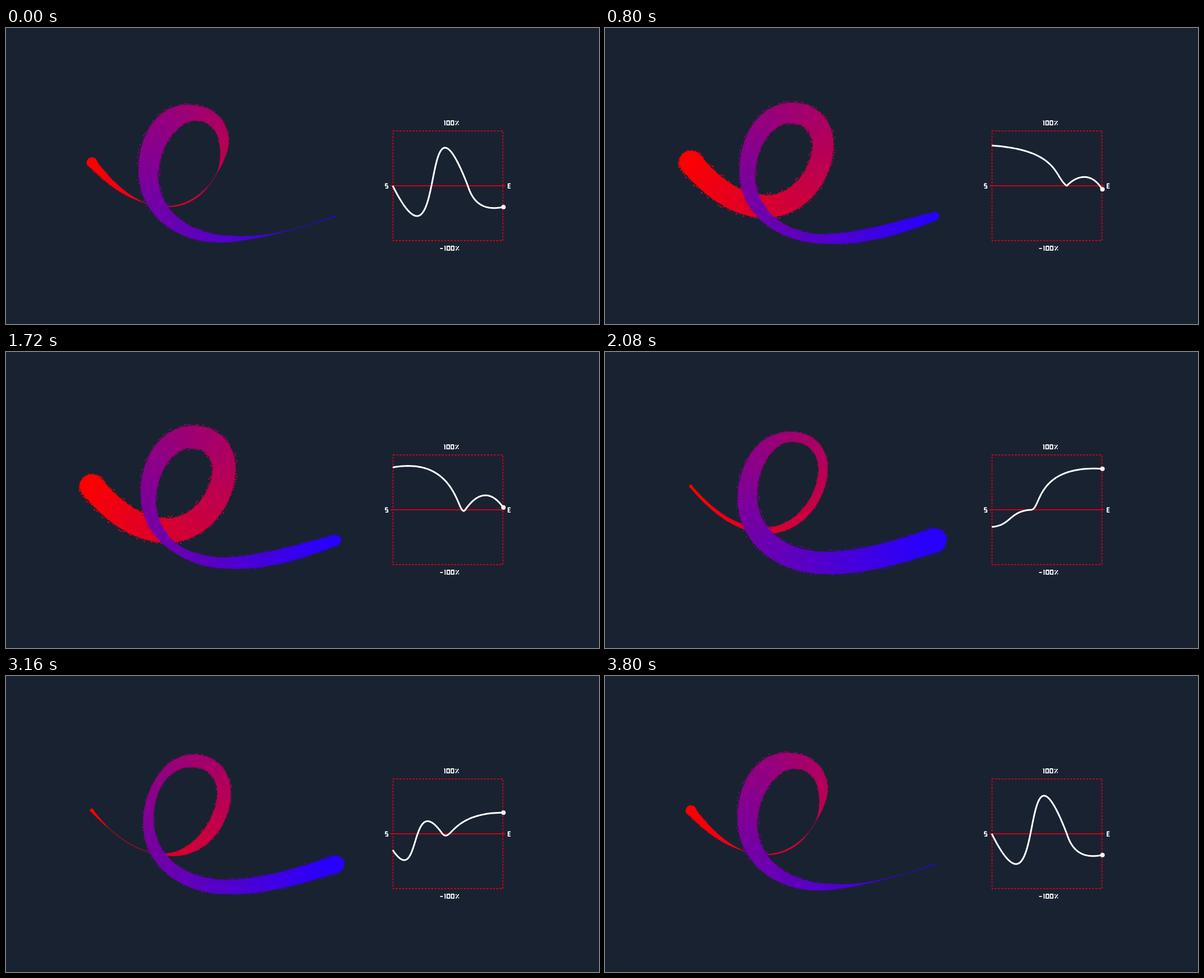
Recreate the animation shown at these times as an HTML page with a canvas. Size 1058x529 px, loop 3.84 s.

```html
<!DOCTYPE html>
<html lang="en">
<head>
<meta charset="utf-8">
<title>Stroke width profile</title>
<style>
  html, body { margin: 0; width: 100%; height: 100%; overflow: hidden; background: #192231; }
  canvas { display: block; width: 1058px; height: 529px; }
</style>
</head>
<body>
<canvas id="stage" width="1058" height="529" role="img" aria-label="Stroke width graph from S to E, 100% to -100%"></canvas>
<script>
const ctx = document.getElementById('stage').getContext('2d');
const LOOP = 3840, TICK = 40;
const LEFT = 690, SPAN = 197, ZERO = 282, HALF = 98;
const BASE = 15.5, GAIN = 2.2, STEPS = 80;

// Brush path: chained cubic beziers, with the profile position of each node
const PATH = [153,240, 195,290, 240,320, 290,319, 345,318, 389,262, 389,208,
  389,174, 366,151.5, 333,151.5, 285,151.5, 254,205, 254,260,
  254,325, 310,377, 395,377, 465,377, 530,355, 588,336.5];
const NODE_U = [0, .175, .35, .38, .555, .70, 1];

// Width profiles: two cubic beziers each, reached at the key times
const POSES = [
  [690,282, 788,479, 737,57, 824,282, 836,321, 861,325, 887,320],
  [690,198, 815,175, 812,302, 824,282, 842,254, 869,245, 887,283],
  [690,329, 712,329, 708,282, 751,282, 770,285, 752,196, 887,198]
];
const KEYS = [0, 1310, 2550, LOOP];

const mix = (a, b, k) => a + (b - a) * k;
const easeQuint = k => k < .5 ? 16 * k ** 5 : 1 - 16 * (1 - k) ** 5;

function cubic(p, seg, t) {
  const o = seg * 6, s = 1 - t;
  const w = [s * s * s, 3 * s * s * t, 3 * s * t * t, t * t * t];
  let x = 0, y = 0;
  w.forEach((k, i) => { x += k * p[o + 2 * i]; y += k * p[o + 2 * i + 1]; });
  return { x, y };
}

function randomizer(seed) {
  return () => {
    seed = (seed * 1664525 + 1013904223) >>> 0;
    return seed / 4294967296;
  };
}

// Sampled brush path with unit normals and fixed edge roughness
const brush = [];
const rand = randomizer(71);
let total = 0;
for (let s = 0; s < NODE_U.length - 1; s++) {
  for (let i = s ? 1 : 0; i <= STEPS; i++) {
    const t = i / STEPS, p = cubic(PATH, s, t);
    const a = cubic(PATH, s, t - .002), b = cubic(PATH, s, t + .002);
    const len = Math.hypot(b.x - a.x, b.y - a.y);
    const last = brush[brush.length - 1] || p;
    total += Math.hypot(p.x - last.x, p.y - last.y);
    brush.push({
      ...p,
      dist: total,
      u: mix(NODE_U[s], NODE_U[s + 1], t),
      nx: (a.y - b.y) / len, ny: (b.x - a.x) / len,
      rough: [rand() ** 2, rand() ** 2]
    });
  }
}
const capRough = Array.from({ length: 48 }, () => rand() ** 2);

function disc(x, y, r) {
  ctx.beginPath();
  ctx.arc(x, y, r, 0, Math.PI * 2);
  ctx.fill();
}

function poseAt(ms) {
  const i = KEYS.findIndex((key, n) => ms < KEYS[n + 1]);
  const k = easeQuint((ms - KEYS[i]) / (KEYS[i + 1] - KEYS[i]));
  const next = POSES[(i + 1) % POSES.length];
  return POSES[i].map((v, j) => mix(v, next[j], k));
}

function drawBrush(profile) {
  let j = 0;
  brush.forEach((p, n) => {
    const gx = LEFT + SPAN * p.u;
    while (j < profile.length - 2 && profile[j + 1].x < gx) j++;
    const a = profile[j], b = profile[j + 1];
    const y = mix(a.y, b.y, (gx - a.x) / (b.x - a.x || 1));
    const r = Math.max(.8, Math.abs(1 + GAIN * (ZERO - y) / HALF) * BASE / 2);
    const amp = Math.min(5, r * .28), dot = Math.min(1.7, r * .3);
    const hue = p.dist / total;
    ctx.fillStyle = `rgb(${255 - 215 * hue},0,${255 * hue})`;
    ctx.globalAlpha = .75;
    if (n % 2 === 0) {
      p.rough.forEach((k, side) => {
        const d = (r - dot * .5 + amp * k) * (side ? -1 : 1);
        disc(p.x + p.nx * d, p.y + p.ny * d, dot);
      });
    }
    if (n === 0 || n === brush.length - 1) {
      capRough.forEach((k, i) => {
        const q = i / capRough.length * Math.PI * 2, d = r - dot * .5 + amp * k * .6;
        disc(p.x + Math.cos(q) * d, p.y + Math.sin(q) * d, dot);
      });
    }
    ctx.globalAlpha = 1;
    disc(p.x, p.y, r);
  });
}

const GLYPHS = {
  '-': ['M0 4H5', 7.5],
  '1': ['M0 .2H1.5V8', 5],
  '0': ['M0 0H4.6V7.2H0Z', 7.6],
  '%': ['M5.6 0L.4 7.4M0 1H1.8M4.4 6.4H6.2', 8],
  'S': ['M4.2 0H0V3.6H4.2V7.6H0', 6],
  'E': ['M4.2 0H0V7.6H4.2M0 3.8H3.6', 6]
};
for (const g of Object.values(GLYPHS)) g[0] = new Path2D(g[0]);

function label(text, x, y) {
  ctx.save();
  ctx.translate(x, y);
  ctx.strokeStyle = '#fff';
  ctx.lineWidth = 1.8;
  for (const ch of text) {
    const [shape, advance] = GLYPHS[ch];
    ctx.stroke(shape);
    ctx.translate(advance, 0);
  }
  ctx.restore();
}

function drawGraph(profile) {
  ctx.strokeStyle = '#d00018';
  ctx.lineWidth = 2;
  ctx.setLineDash([3.4, 2.4]);
  ctx.strokeRect(LEFT + .5, ZERO - HALF, SPAN - 1, HALF * 2);
  ctx.setLineDash([]);
  ctx.beginPath();
  ctx.moveTo(686, ZERO);
  ctx.lineTo(891, ZERO);
  ctx.stroke();

  label('100%', 781.5, 166);
  label('-100%', 774.5, 390);
  label('S', 677, 278.5);
  label('E', 896, 278.5);

  ctx.strokeStyle = ctx.fillStyle = '#fff';
  ctx.lineWidth = 3;
  ctx.lineJoin = 'round';
  ctx.beginPath();
  profile.forEach(p => ctx.lineTo(p.x, p.y));
  ctx.stroke();
  const end = profile[profile.length - 1];
  disc(end.x + .5, end.y, 4);
}

function draw(ms) {
  const pose = poseAt(ms), profile = [];
  for (let s = 0; s < 2; s++)
    for (let i = s; i <= 60; i++) profile.push(cubic(pose, s, i / 60));
  ctx.fillStyle = '#192231';
  ctx.fillRect(0, 0, 1058, 529);
  drawBrush(profile);
  drawGraph(profile);
}

const start = performance.now();
function frame() {
  const ms = (performance.now() - start) % LOOP;
  draw(Math.floor(ms / TICK) * TICK);
  requestAnimationFrame(frame);
}
frame();
</script>
</body>
</html>
```
